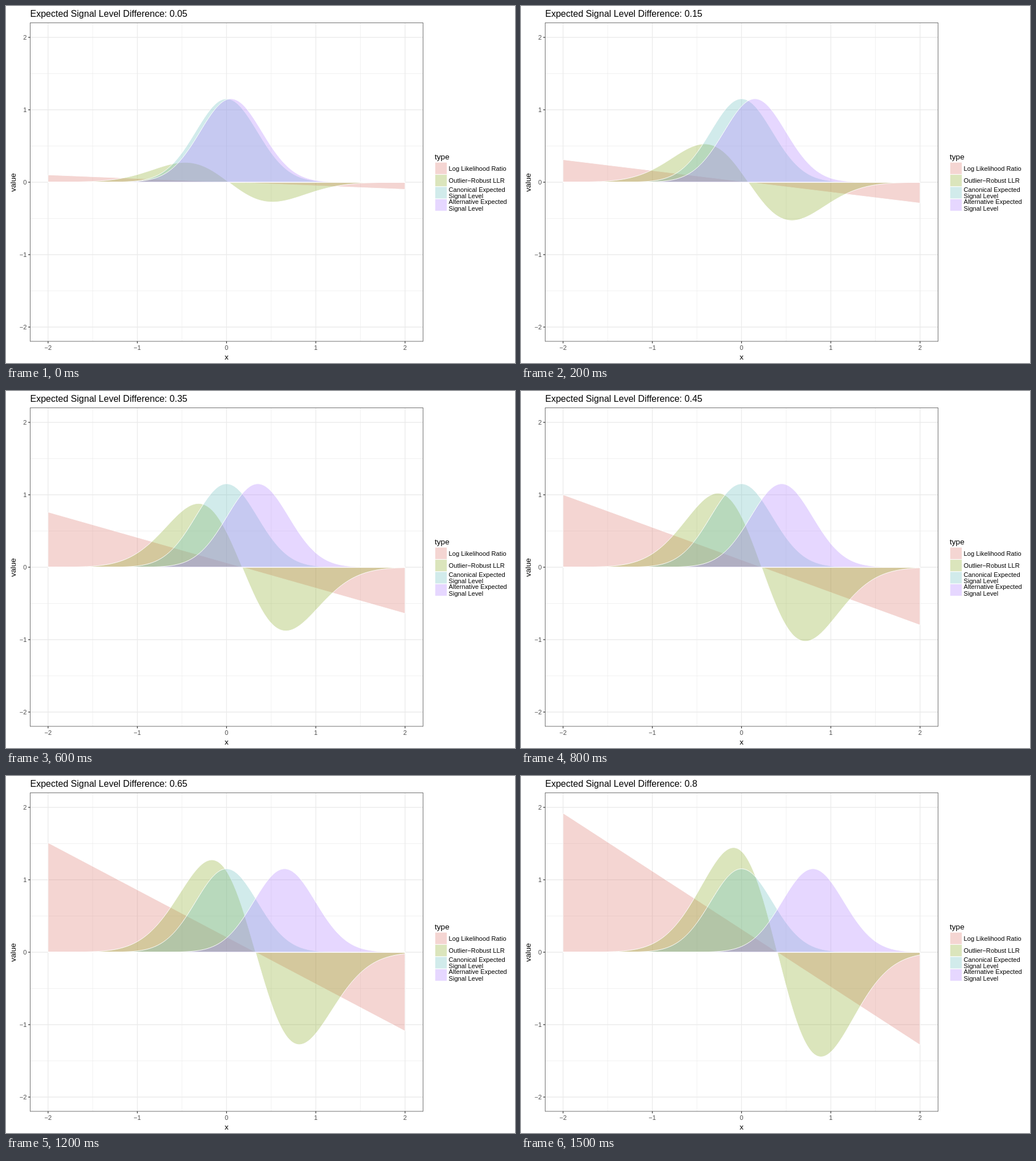
Animation, 894 px wide and 626 px high, one loop 1600 ms. Source, as an HTML page with a canvas:

```html
<!DOCTYPE html>
<html lang="en">
<head>
<meta charset="utf-8">
<title>Expected signal level difference</title>
<style>
  html, body { margin: 0; width: 100%; height: 100%; overflow: hidden; background: #fff; }
  canvas { display: block; }
</style>
</head>
<body>
<canvas id="plot" width="894" height="626"></canvas>
<script>
const ctx = document.getElementById("plot").getContext("2d");

const STEP_MS = 100, STEPS = 16, STEP = 0.05;
const VARIANCE = 0.12;
const PANEL = { left: 42.5, right: 732.5, top: 29.5, bottom: 588 };
const FILL_ALPHA = 0.3;
const RED = "rgb(218,115,108)", GREEN = "rgb(135,168,35)";
const TEAL = "rgb(105,188,188)", PURPLE = "rgb(172,122,255)";

const px = x => 387.4 + 156.75 * x;
const py = y => 309 - 127 * y;

const normal = (x, mean) =>
  Math.exp(-((x - mean) ** 2) / (2 * VARIANCE)) / Math.sqrt(2 * Math.PI * VARIANCE);
const logRatio = (x, d) => -d * (x - d / 2);
const robustRatio = (x, d) => {
  const u = x - d / 2;
  return -2 * d * u * Math.exp(-u * u / (4 * VARIANCE)) / (3 * VARIANCE * d ** 0.4);
};

function line(x1, y1, x2, y2, color, width) {
  ctx.strokeStyle = color;
  ctx.lineWidth = width;
  ctx.beginPath();
  ctx.moveTo(x1, y1);
  ctx.lineTo(x2, y2);
  ctx.stroke();
}

function text(str, x, y, size, color = "#000", align = "left") {
  ctx.font = `${size}px "Liberation Sans", Arial, sans-serif`;
  ctx.fillStyle = color;
  ctx.textAlign = align;
  ctx.fillText(str, x, y);
}

function grid(start, color, width) {
  for (let v = start; v <= -start; v++) {
    line(PANEL.left, py(v), PANEL.right, py(v), color, width);
    line(px(v), PANEL.top, px(v), PANEL.bottom, color, width);
  }
}

function paint(color) {
  ctx.globalAlpha = FILL_ALPHA;
  ctx.fillStyle = color;
  ctx.fill();
  ctx.globalAlpha = 1;
  ctx.strokeStyle = "#fff";
  ctx.lineWidth = 1;
  ctx.stroke();
}

function area(f, color) {
  ctx.beginPath();
  ctx.moveTo(px(-2), py(0));
  for (let i = -200; i <= 200; i++) ctx.lineTo(px(i / 100), py(f(i / 100)));
  ctx.lineTo(px(2), py(0));
  ctx.closePath();
  paint(color);
}

function axes() {
  ctx.strokeStyle = "#707070";
  ctx.lineWidth = 1;
  ctx.strokeRect(PANEL.left, PANEL.top, PANEL.right - PANEL.left, PANEL.bottom - PANEL.top);
  for (let v = -2; v <= 2; v++) {
    const label = String(v).replace("-", "\u2212");
    line(PANEL.left - 3.5, py(v), PANEL.left, py(v), "#333", 1.2);
    line(px(v), PANEL.bottom, px(v), PANEL.bottom + 3.5, "#333", 1.2);
    text(label, 36.5, py(v) + 4, 11.17, "#4d4d4d", "right");
    text(label, px(v), 603, 11.17, "#4d4d4d", "center");
  }
  text("x", px(0), 619.5, 13.65, "#000", "center");
  ctx.save();
  ctx.translate(17, 309.5);
  ctx.rotate(-Math.PI / 2);
  text("value", 0, 0, 13.65, "#000", "center");
  ctx.restore();
}

function legend() {
  const entries = [
    [RED, "Log Likelihood Ratio"],
    [GREEN, "Outlier\u2212Robust LLR"],
    [TEAL, "Canonical Expected", "Signal Level"],
    [PURPLE, "Alternative Expected", "Signal Level"]
  ];
  const key = 21.4;
  text("type", 753, 269, 13.65);
  entries.forEach(([color, ...lines], i) => {
    const top = 274 + i * key;
    ctx.beginPath();
    ctx.rect(753.4, top, key, key);
    paint(color);
    const first = top + key / 2 + 4 - (lines.length - 1) * 5.6;
    lines.forEach((str, j) => text(str, 777.5, first + j * 11.2, 11.17));
  });
}

function draw(d) {
  ctx.fillStyle = "#fff";
  ctx.fillRect(0, 0, 894, 626);
  grid(-1.5, "#ebebeb", 0.7);
  grid(-2, "#ebebeb", 1.33);
  area(x => logRatio(x, d), RED);
  area(x => robustRatio(x, d), GREEN);
  area(x => normal(x, 0), TEAL);
  area(x => normal(x, d), PURPLE);
  axes();
  legend();
  text("Expected Signal Level Difference: " + Number(d.toFixed(2)), 42.5, 18.5, 16.05);
}

const start = performance.now();
function tick() {
  const elapsed = performance.now() - start;
  const step = Math.floor(elapsed / STEP_MS) % STEPS;
  draw(STEP * (step + 1));
  requestAnimationFrame(tick);
}
tick();
</script>
</body>
</html>
```
